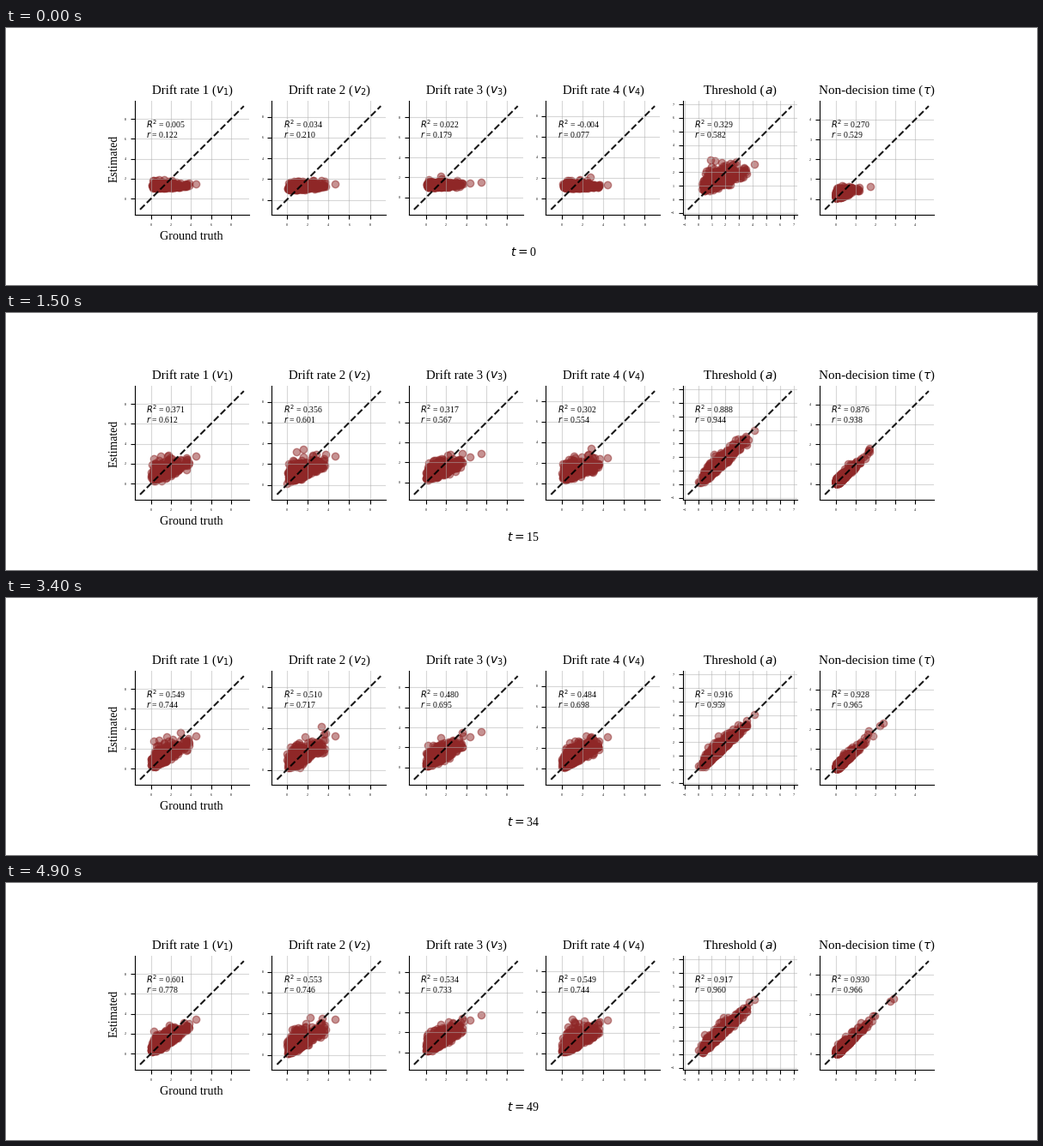
These frames come from a looping animation (1200x300 px, 5 s). A matplotlib script:

```python
import numpy as np
import matplotlib.pyplot as plt
from matplotlib.animation import FuncAnimation

plt.rcParams["font.family"] = "Liberation Serif"
plt.rcParams["mathtext.fontset"] = "dejavusans"

W, H, DPI = 1200, 300, 100
FRAMES, STEP_MS = 50, 100
N = 500
RED = "#8f2727"
SIDE = 930 / 7                       # panel side in pixels


def panel(name, symbol, size, sym_x, sym_w, unit, zero, ticks, fit, prior, tail, drift=0):
    """unit, zero: pixels per unit and to zero; fit: R2 start, gain, time constant;
    prior: gamma shape, scale, walk step, top, least spread, floor."""
    return dict(name=name, symbol=symbol, size=size, sym_x=sym_x, sym_w=sym_w,
                unit=unit, zero=zero, ticks=list(ticks), fit=fit, prior=prior,
                tail=np.array(tail), drift=drift)


def drift_rate(k, unit, zero, fit, tail):
    return panel(f"Drift rate {k} (", f"$v_{k}$", 10.75, 28, 14.4, unit, zero,
                 range(0, 9, 2), fit, (2.5, 0.5, 0.02, 3.8, 0.13, 0.12), tail)


PANELS = [
    drift_rate(1, 11.62, 18.9, (0.005, 0.635, 17.5), [4.45]),
    drift_rate(2, 12.1, 17.4, (0.034, 0.55, 17), [4.65]),
    drift_rate(3, 11.73, 20.0, (0.022, 0.56, 20), [5.45, 4.4]),
    drift_rate(4, 12.05, 18.8, (-0.004, 0.62, 22), [4.4]),
    panel("Threshold (", "$a$", 11, 28.9, 8.5, 15.85, 17.9, range(-1, 8),
          (0.329, 0.588, 5), (4, 0.36, 0.02, 3.8, 0.1, 0.1), [4.12]),
    panel("Non-decision time (", r"$\tau$", 10.9, 53.6, 8.4, 23.18, 18.38, range(5),
          (0.270, 0.66, 6), (1.5, 0.19, 0.05, 2.0, 0.02, 0.02), [1.2, 1.05], 1.7),
]


def scores(p, t):
    """R2 rising towards its limit, and the matching correlation."""
    start, gain, tau = p["fit"]
    r2 = start + gain * (1 - np.exp(-t / tau))
    return r2, np.sqrt(r2 + 0.004 + 0.006 * np.exp(-t / 5))


def simulate(seed, p):
    """Random walk of true values and slowly varying skewed noise."""
    shape, scale, step, top = p["prior"][:4]
    rng = np.random.default_rng(seed)
    x = rng.gamma(shape, scale, N)
    rate = step * rng.exponential(1, N)
    z = rng.normal(size=N)
    states = []
    for _ in range(FRAMES):
        x = np.maximum(np.minimum(x, 2 * top - x), 0)
        states.append((x, (np.exp(0.3 * z) - 1) / 0.3 - 0.15))
        x = x + rate * rng.normal(size=N)
        z = 0.95 * z + np.sqrt(1 - 0.95 ** 2) * rng.normal(size=N)
    return states


def points(p, state, t):
    spread, floor = p["prior"][4:]
    x, noise = state
    mean, r = x.mean(), scores(p, t)[1]
    sd = max(r * np.sqrt(1 - r * r) * x.std(), spread)
    far = p["tail"] + p["drift"] * t / (FRAMES - 1)
    x = np.append(x, far)
    noise = np.append(noise, np.full(far.size, 0.7))
    y = mean + r * r * (x - mean) + sd * noise
    return np.column_stack([x, floor + np.abs(y - floor)])


def title(ax, p):
    for s, dx, pt, ha in ((p["name"], p["sym_x"], p["size"], "right"),
                          (p["symbol"], p["sym_x"], 10, "left"),
                          (")", p["sym_x"] + p["sym_w"], 10.5, "left")):
        ax.annotate(s, (0.5, 1), xycoords="axes fraction",
                    xytext=(dx * 72 / DPI, 6), textcoords="offset points",
                    ha=ha, va="baseline", size=pt)


def setup(ax, p):
    lo, hi = -p["zero"] / p["unit"], (SIDE - p["zero"]) / p["unit"]
    pad = (hi - lo) / 22
    ends = [lo + pad, hi - pad]
    ax.set_box_aspect(1)
    ax.set(xticks=p["ticks"], yticks=p["ticks"])
    ax.tick_params(labelsize=3)
    ax.grid(alpha=0.5)
    ax.spines[["top", "right"]].set_visible(False)
    ax.plot(ends, ends, "--", color="black", alpha=0.9)
    ax.set(xlim=(lo, hi), ylim=(lo, hi))
    title(ax, p)
    dots = ax.scatter([], [], color=RED, alpha=0.5)
    top, low = (ax.text(0.1, y, "", size=7, va="center", transform=ax.transAxes)
                for y in (0.8, 0.7))
    return dots, top, low


DATA = [simulate(11 + i, p) for i, p in enumerate(PANELS)]

fig, axes = plt.subplots(1, 6, figsize=(W / DPI, H / DPI), dpi=DPI)
artists = [setup(ax, p) for ax, p in zip(axes, PANELS)]


def label(x, y, s, size, **kw):
    return fig.text(x / W, 1 - y / H, s, size=size, ha="center", va="baseline", **kw)


label(216.2, 247, "Ground truth", 10.2)
label(130, 152.3, "Estimated", 9.9, rotation=90, rotation_mode="anchor")
clock = label(602, 266.5, "", 10)


def update(t):
    for p, states, (dots, top, low) in zip(PANELS, DATA, artists):
        r2, r = scores(p, t)
        dots.set_offsets(points(p, states[t], t))
        top.set_text(f"$R^2$ = {r2:.3f}")
        low.set_text(f"$r$ = {r:.3f}")
    clock.set_text(f"$t=${t}")
    return []


anim = FuncAnimation(fig, update, frames=FRAMES, interval=STEP_MS, repeat=True)
plt.show()
```
